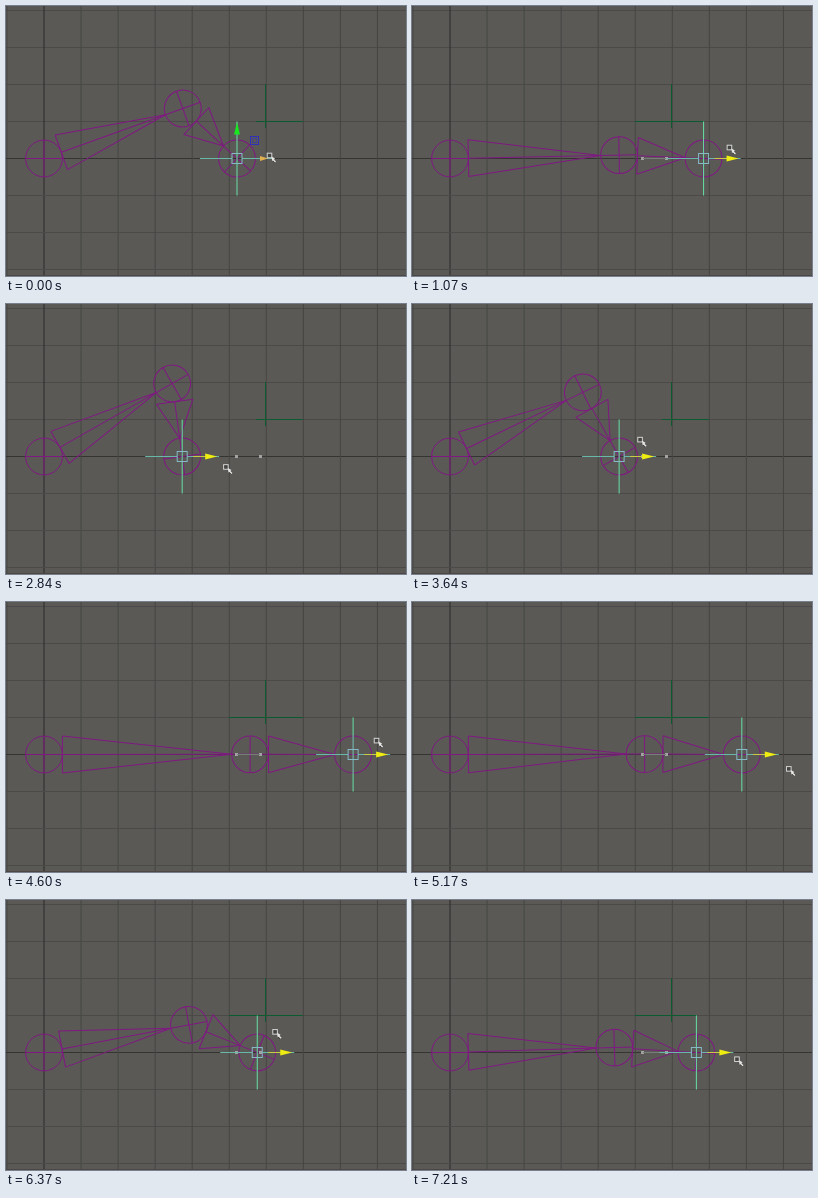
Animation of 400x270 px, one loop 7250 ms. Source, as an HTML page with a canvas:

```html
<!DOCTYPE html>
<html>
<head>
<meta charset="utf-8">
<style>
html, body { margin: 0; width: 100%; height: 100%; overflow: hidden; background: #5a5956; }
canvas { display: block; }
</style>
</head>
<body>
<canvas id="stage" width="400" height="270"></canvas>
<script>
const ctx = document.getElementById('stage').getContext('2d');
const LOOP = 7250, GRAB = 90, LAG = 80;
const ROOT = { x: 38, y: 152.5 };
const L1 = 147.5, L2 = 73.7, SOFT = 9, R = 18.4, AXIS = 37, CELL = 37.05;
const PURPLE = '#801882', MINT = '#66e0a4', TEAL = '#68b8aa', YELLOW = '#eeec10';

// Where the drag passes or turns: time, handle x
const path = [[GRAB, 231], [1070, 291.5], [1690, 366], [2100, 301.5], [3180, 152], [3640, 207],
  [4600, 347], [4840, 367], [5710, 216], [5890, 192], [6860, 312], [7250, 281]];

const slope = k => (path[k + 1][1] - path[k][1]) / (path[k + 1][0] - path[k][0]);

function tangent(k) {
  if (k === 0) return 0;
  if (k === path.length - 1) return slope(k - 1);
  const a = slope(k - 1), b = slope(k);
  return a * b <= 0 ? 0 : 2 * a * b / (a + b);
}

// Monotone cubic through the path
function handleAt(t) {
  if (t <= GRAB) return path[0][1];
  let i = 0;
  while (i < path.length - 2 && t >= path[i + 1][0]) i++;
  const [t0, v0] = path[i], [t1, v1] = path[i + 1];
  const h = t1 - t0, u = (t - t0) / h, w = 1 - u;
  return v0 * (1 + 2 * u) * w * w + v1 * u * u * (3 - 2 * u)
    + h * u * w * (tangent(i) * w - tangent(i + 1) * u);
}

// Soft, stretching two-bone solve
function solveElbow(dist) {
  const full = L1 + L2, start = full - SOFT;
  const reach = dist > start ? full - SOFT * Math.exp((start - dist) / SOFT) : dist;
  const stretch = dist / reach;
  const x = (reach * reach + L1 * L1 - L2 * L2) / (2 * reach);
  const y = Math.sqrt(Math.max(0, L1 * L1 - x * x));
  return { x: ROOT.x + x * stretch, y: ROOT.y - y * stretch };
}

function line(color, x1, y1, x2, y2) {
  ctx.strokeStyle = color;
  ctx.beginPath();
  ctx.moveTo(x1, y1);
  ctx.lineTo(x2, y2);
  ctx.stroke();
}

function poly(color, ...pts) {
  ctx.fillStyle = color;
  ctx.beginPath();
  for (let i = 0; i < pts.length; i += 2) ctx.lineTo(pts[i], pts[i + 1]);
  ctx.fill();
}

function box(color, x, y, half) {
  ctx.strokeStyle = color;
  ctx.strokeRect(x - half, y - half, half * 2, half * 2);
}

// Run a drawing in a frame placed at p and turned by angle
function at(p, angle, paint) {
  ctx.save();
  ctx.translate(p.x, p.y);
  ctx.rotate(angle);
  paint();
  ctx.restore();
}

function drawGrid() {
  ctx.fillStyle = '#5a5956';
  ctx.fillRect(0, 0, 400, 270);
  for (let i = -4; i < 10; i++) {
    const x = ROOT.x + i * CELL, y = Math.floor(ROOT.y + i * CELL) + 0.5;
    line(i ? '#464543' : '#2a2a28', x, 0, x, 270);
    line(i ? '#4b4a48' : '#343432', 0, y, 400, y);
  }
  line('#4c4644', 0, 269.5, 400, 269.5);
}

function drawLocator(x) {
  const c = '#0c5a30';
  line(c, 259.5, 78, 259.5, 122);
  line(c, x > 240 ? 223 : 250, 115.5, x > 262 ? Math.min(297, x) : 297, 115.5);
}

function drawJoint(p, angle) {
  at(p, angle, () => {
    ctx.strokeStyle = PURPLE;
    ctx.beginPath();
    ctx.arc(0, 0, R, 0, Math.PI * 2);
    ctx.stroke();
    line(PURPLE, -R, 0, R, 0);
    line(PURPLE, 0, -R, 0, R);
  });
}

function drawBone(a, b) {
  const angle = Math.atan2(b.y - a.y, b.x - a.x);
  const end = Math.hypot(b.x - a.x, b.y - a.y) - R;
  at(a, angle, () => {
    line(PURPLE, R, -R, R, R);
    for (const y of [-R, 0, R]) line(PURPLE, R, y, end, 0);
  });
  return angle;
}

function drawManipulator(x, dragging) {
  const y = ROOT.y;
  if (dragging) {
    ctx.fillStyle = '#a3a3a3';
    ctx.fillRect(229, 151, 3, 3);
    ctx.fillRect(253, 151, 3, 3);
    if (x > 254) line('#777d78', 231, y, 254, y);
  }
  line(TEAL, x - AXIS, y, x - 5, y);
  line(TEAL, x + 5, y, x + AXIS, y);
  line(MINT, x, y - AXIS, x, y + AXIS);
  if (dragging) {
    line('#c9c944', x + 11, y, x + 24, y);
    poly(YELLOW, x + 23, y - 3, x + 35, y, x + 23, y + 3);
  } else {
    poly('#e0b050', x + 23, y - 2.5, x + 31, y, x + 23, y + 2.5);
    poly('#18e820', x, y - 36, x + 3, y - 24, x - 3, y - 24);
    box('#3030b8', x + 17.5, y - 18, 4);
    box('#40409c', x + 17.5, y - 18, 2);
  }
  box('#86b8c6', x, y, 5);
}

function drawCursor(x, y) {
  ctx.fillStyle = '#444442';
  ctx.fillRect(x - 2, y - 2, 4, 4);
  box('#d2d2d0', x, y, 2.3);
  line('#2c2c2a', x + 2, y + 4, x + 5, y + 7);
  poly('#e6e6e4', x + 2, y + 1, x + 5.5, y + 3, x + 4.5, y + 4, x + 6.5, y + 6,
    x + 5.5, y + 7, x + 3.5, y + 5, x + 2.5, y + 5.5);
}

function draw(t) {
  const x = handleAt(t), tip = { x, y: ROOT.y };
  const elbow = solveElbow(x - ROOT.x);
  const sway = x - handleAt(t - LAG);
  ctx.lineWidth = 1;
  drawGrid();
  drawLocator(x);
  const upper = drawBone(ROOT, elbow);
  const lower = drawBone(elbow, tip);
  drawJoint(ROOT, 0);
  drawJoint(elbow, upper);
  drawJoint(tip, lower);
  drawManipulator(x, t >= GRAB);
  // The pointer trails the handle and swings up or down with its speed
  drawCursor(x + 32.5 - sway, 149.5 - 1.2 * sway);
}

const begin = performance.now();
function tick() {
  draw((performance.now() - begin) % LOOP);
  requestAnimationFrame(tick);
}
tick();
</script>
</body>
</html>
```
